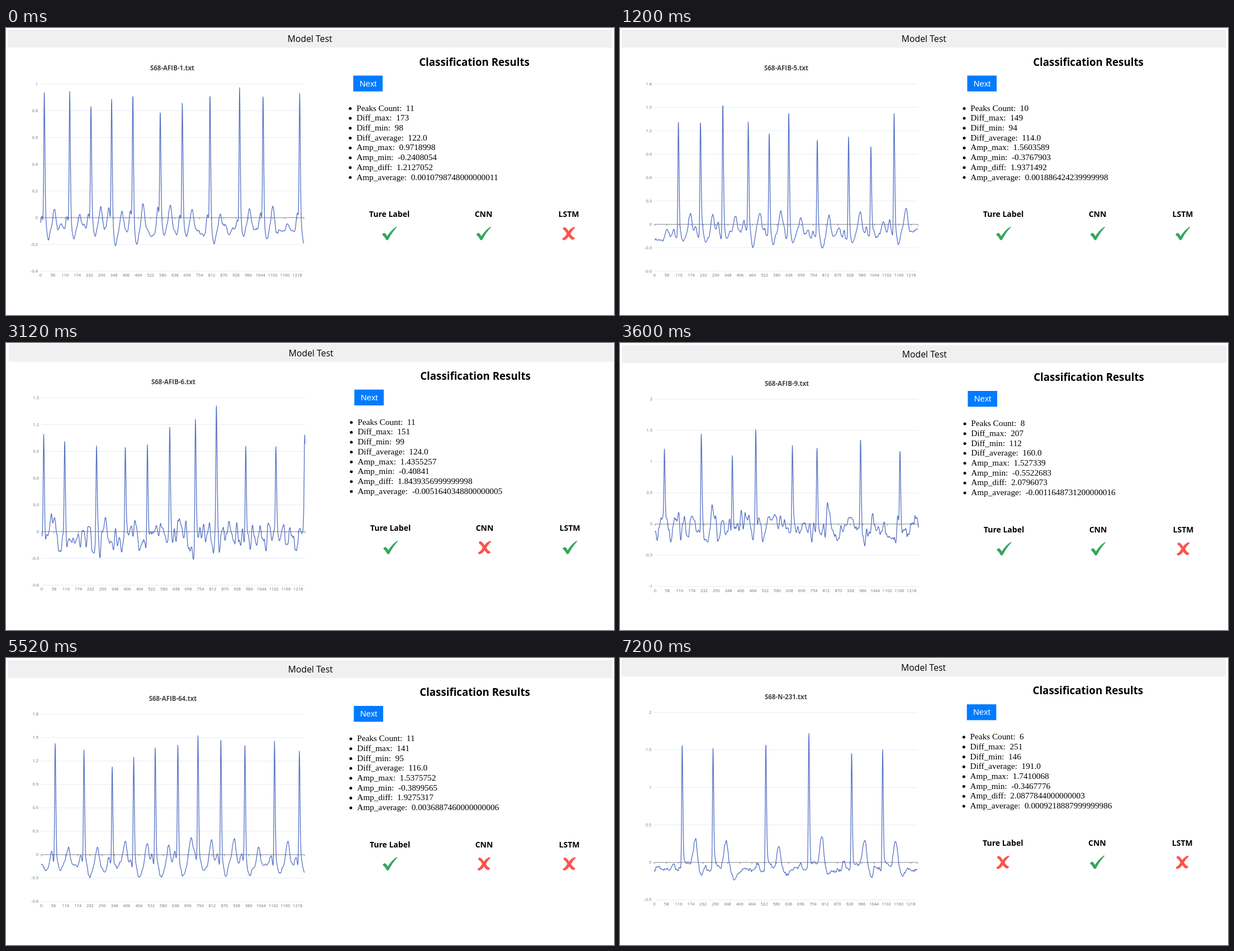
An HTML page for the animation above (8400 ms loop, 1088 by 515 pixels).

```html
<!DOCTYPE html>
<html lang="en">
<head>
<meta charset="utf-8">
<title>Model Test</title>
<style>
html, body { margin: 0; width: 100%; height: 100%; overflow: hidden; background: #fff; }
svg { display: block; width: 1088px; height: 515px; }
text { white-space: pre; }
.ui { font-family: "Open Sans", "Noto Sans", sans-serif; }
.bold { font-weight: 700; }
.axis { font-size: 7.5px; fill: #6e7079; }
.stat { font: 15.27px "Liberation Serif", serif; }
.button { font: 14.8px "Liberation Sans", sans-serif; fill: #fff; }
.mid { text-anchor: middle; }
.end { text-anchor: end; }
.scene { visibility: hidden; animation: show 8400ms step-end infinite; }
@keyframes show {
  0% { visibility: visible; }
  14.28572%, 100% { visibility: hidden; }
}
</style>
</head>
<body>
<svg id="stage" viewBox="0 0 1088 515"></svg>
<script>
// Each trace is a row of beats: [x, y] of the spikes, the resting level, and
// the waves around every spike as [offset from spike, height, width before, width after].
const scenes = [
  { file: 'S68-AFIB-1.txt', dx: 0, dy: 0, min: -0.4, step: 0.2, rows: 7, marks: 'vvx',
    stats: ['11', '173', '98', '122.0', '0.9718998', '-0.2408054', '1.2127052', '0.0010798748000000011'],
    spikes: [[68.5, 115], [114, 113], [152, 138], [189, 126], [227, 118], [276, 148], [315.5, 134], [365, 118], [418, 107], [460, 120], [525.5, 117]],
    rest: 363, waves: [[-4.5, 34, 3, 3], [7, -22, 4, 3], [18, 34, 4, 4]], wander: [22, 7], noise: 4 },
  { file: 'S68-AFIB-5.txt', dx: 0, dy: 0, min: -0.6, step: 0.3, rows: 8, marks: 'vvv',
    stats: ['10', '149', '94', '114.0', '1.5603589', '-0.3767903', '1.9371492', '0.001886424239999998'],
    spikes: [[104.5, 167], [144, 167], [184, 134], [229.5, 168], [267, 187], [302, 150], [353, 199], [409, 195], [449, 212], [490.5, 152]],
    rest: 372, waves: [[-8, 18, 3, 2], [8, -12, 4, 4], [21.5, 40, 5, 4]], wander: [28, 7], noise: 4 },
  { file: 'S68-AFIB-6.txt', dx: 2, dy: -1.8, min: -0.6, step: 0.3, rows: 7, marks: 'vxv',
    stats: ['11', '151', '99', '124.0', '1.4355257', '-0.40841', '1.8439356999999998', '-0.0051640348800000005'],
    spikes: [[67.5, 163], [105, 175], [162, 184], [213.5, 185], [253, 182], [293, 150], [339, 136], [376.5, 110], [429, 185], [483, 186], [534.5, 163]],
    rest: 348, waves: [[-4, -16, 3, 2], [6, -20, 3, 3], [16, 18, 4, 4]], wander: [54, 3.5], noise: 7 },
  { file: 'S68-AFIB-9.txt', dx: 1, dy: 0.6, min: -1, step: 0.5, rows: 6, marks: 'vvx',
    stats: ['8', '207', '112', '160.0', '1.527339', '-0.5522683', '2.0796073', '-0.0011648731200000016'],
    spikes: [[79.5, 189], [145.5, 162], [201, 202], [243, 154], [308.5, 184], [352.5, 187], [430.5, 171], [501, 192]],
    rest: 333, waves: [[9, -14, 4, 4], [21, 24, 5, 5]], wander: [50, 3.5], noise: 8 },
  { file: 'S68-AFIB-64.txt', dx: 1, dy: 0.6, min: -0.6, step: 0.3, rows: 8, marks: 'vxx',
    stats: ['11', '141', '95', '116.0', '1.5375752', '-0.3899565', '1.9275317', '0.0036887460000000006'],
    spikes: [[88, 152], [139.5, 164], [190, 194], [228.5, 177], [267, 161], [307.5, 154], [343.5, 138], [384.5, 143], [427.5, 153], [480.5, 149], [525, 167]],
    rest: 375, waves: [[-6, 20, 3, 3], [9, -12, 4, 4], [24, 40, 5, 4]], wander: [20, 8], noise: 4 },
  { file: 'S68-N-222.txt', dx: 0, dy: -0.7, min: -0.3, step: 0.3, rows: 7, marks: 'xvv', edge: true,
    stats: ['5', '230', '223', '227.0', '1.6924769', '-0.2355796', '1.9280564999999998', '-0.002497430559999999'],
    spikes: [[108, 127], [194.5, 151], [278.5, 117], [363, 133], [450, 143]],
    rest: 406, waves: [[-18.5, 22, 3, 3], [26, 79, 7, 5]], wander: [10, 5], noise: 8 },
  { file: 'S68-N-231.txt', dx: -0.7, dy: -2.3, min: -0.5, step: 0.5, rows: 5, marks: 'xvx',
    stats: ['6', '251', '146', '191.0', '1.7410068', '-0.3467776', '2.0877844000000003', '0.0009218887999999986'],
    spikes: [[111.3, 153], [166.5, 162], [261, 152], [338, 133], [414.5, 168], [470, 163]],
    rest: 380, waves: [[-15, 12, 3, 3], [9, 9, 5, 5], [23.5, 50, 6, 4.5], [37, -12, 5, 6]], wander: [8, 6], noise: 6 }
];
const statNames = ['Peaks Count', 'Diff_max', 'Diff_min', 'Diff_average', 'Amp_max', 'Amp_min', 'Amp_diff', 'Amp_average'];
const columns = [['Ture Label', 686], ['CNN', 854.5], ['LSTM', 1007]];
const icons = {
  v: ['#34a65c', 'M-13 2Q-11-1-9-1Q-6 0-4 5Q3-6 12-12L13.5-11.5Q4-1-2 11Q-4 13-6 11Q-9 5-13 2Z'],
  x: ['#fb544c', 'M-9.5-11Q-5-12-.5-4Q4-10 10-12L11.5-10Q7-7 3 .5Q6 6 11 8Q9 12 6 11Q3 10 0 5Q-4 11-9 12Q-12 12-11.5 9Q-6 6-3.5 0Q-6-5-10.5-8Z']
};
const chart = { left: 62, right: 533, top: 100, bottom: 436, samples: 1250 };

const hash = n => { const s = Math.sin(n * 127.1 + 11.7) * 43758.5453; return s - Math.floor(s); };
const mix = (a, b, t) => a + (b - a) * t;
const bell = (d, before, after) => Math.exp(-((d / (d < 0 ? before : after)) ** 2));

function smoothNoise(x, period, seed) {
  const u = x / period, i = Math.floor(u), t = u - i;
  return mix(hash(i + seed * 997), hash(i + 1 + seed * 997), t * t * (3 - 2 * t)) - 0.5;
}

// A narrow spike whose falling side ends in a short tail.
const spikeShape = d => d < 0 ? bell(d, 1.3, 1.3) : 0.78 * bell(d, 1.6, 1.6) + 0.22 * Math.exp(-d / 3);

function traceHeight(x, { spikes, rest, waves, wander: [swing, period], noise }, seed) {
  let y = rest + swing * smoothNoise(x, period, seed) + noise * smoothNoise(x, 1.6, seed + 50);
  spikes.forEach(([sx], i) => {
    for (const [offset, height, before, after] of waves) {
      const scale = 0.8 + 0.4 * hash(seed * 31 + i * 7 + offset);
      y -= height * scale * bell(x - sx - offset, before, after);
    }
  });
  return spikes.reduce((level, [sx, sy]) => mix(level, sy, spikeShape(x - sx)), y);
}

function tracePath(scene, seed) {
  const points = Array.from({ length: chart.samples }, (_, i) => {
    const x = mix(chart.left, chart.right, i / (chart.samples - 1)) + scene.dx;
    return x.toFixed(2) + ' ' + traceHeight(x, scene, seed).toFixed(2);
  });
  return 'M' + points.join('L');
}

const text = (x, y, cls, str, extra = '') => `<text x="${x}" y="${y}" class="${cls}" ${extra}>${str}</text>`;
const line = (x1, y1, x2, y2, color) =>
  `<path d="M${x1} ${y1}L${x2} ${y2}" stroke="${color}" stroke-width=".8"/>`;

function chartMarkup({ file, min, step, rows }) {
  const { left, right, top, bottom, samples } = chart;
  const rowHeight = (bottom - top) / rows;
  const zero = bottom + min / step * rowHeight;
  let out = text(297.5, 76, 'ui bold mid', file, 'font-size="11.5" fill="#464646"');
  for (let r = 0; r <= rows; r++) {
    const y = bottom - r * rowHeight + 0.3;
    out += line(left, y, right, y, '#e0e6f1');
    out += text(57, y + 2.2, 'ui axis end', +(min + r * step).toFixed(1) || 0);
  }
  out += line(left, zero + 0.3, right, zero + 0.3, '#6e7079');
  for (let n = 0; n < samples; n += 58) {
    const x = mix(left, right, n / samples);
    out += line(x, zero, x, zero + 3.2, '#6e7079') + text(x, 446.2, 'ui axis mid', n);
  }
  return out + line(right, zero, right, zero + 3.2, '#6e7079');
}

function panelMarkup({ stats, marks }) {
  let out = text(838, 67.6, 'ui bold mid', 'Classification Results', 'font-size="18.7"');
  out += '<rect x="621.4" y="85.4" width="52.6" height="28.4" fill="#007bff"/>' + text(648, 104.6, 'button mid', 'Next');
  stats.forEach((value, i) => {
    const y = 148.6 + i * 17.7;
    out += `<circle cx="616" cy="${y - 4.2}" r="2.5"/>` + text(627.2, y, 'stat', `${statNames[i]}:  ${value}`);
  });
  columns.forEach(([label, x], i) => {
    const [color, shape] = icons[marks[i]];
    out += text(x, 339, 'ui bold mid', label, 'font-size="14"');
    out += `<path transform="translate(${x} 368.7)" d="${shape}" fill="${color}"/>`;
  });
  return out;
}

document.getElementById('stage').innerHTML = scenes.map((scene, i) => `
  <g class="scene" style="animation-delay:${i ? i * 1200 - 8400 : 0}ms">
    <g transform="translate(${scene.dx} ${scene.dy})">
      <rect x="3" y="3" width="1081.5" height="32.3" fill="#f0f0f0"/>
      ${text(543.8, 25.4, 'ui mid', 'Model Test', 'font-size="15.8"')}
      ${chartMarkup(scene)}${panelMarkup(scene)}
    </g>
    <path d="${tracePath(scene, i + 1)}" fill="none" stroke="#5470c6" stroke-width="1.3" stroke-linejoin="round"/>
    ${scene.edge ? '<rect x="1087" width="1" height="515" fill="#6b6b6b"/>' : ''}
  </g>`).join('');
</script>
</body>
</html>
```
